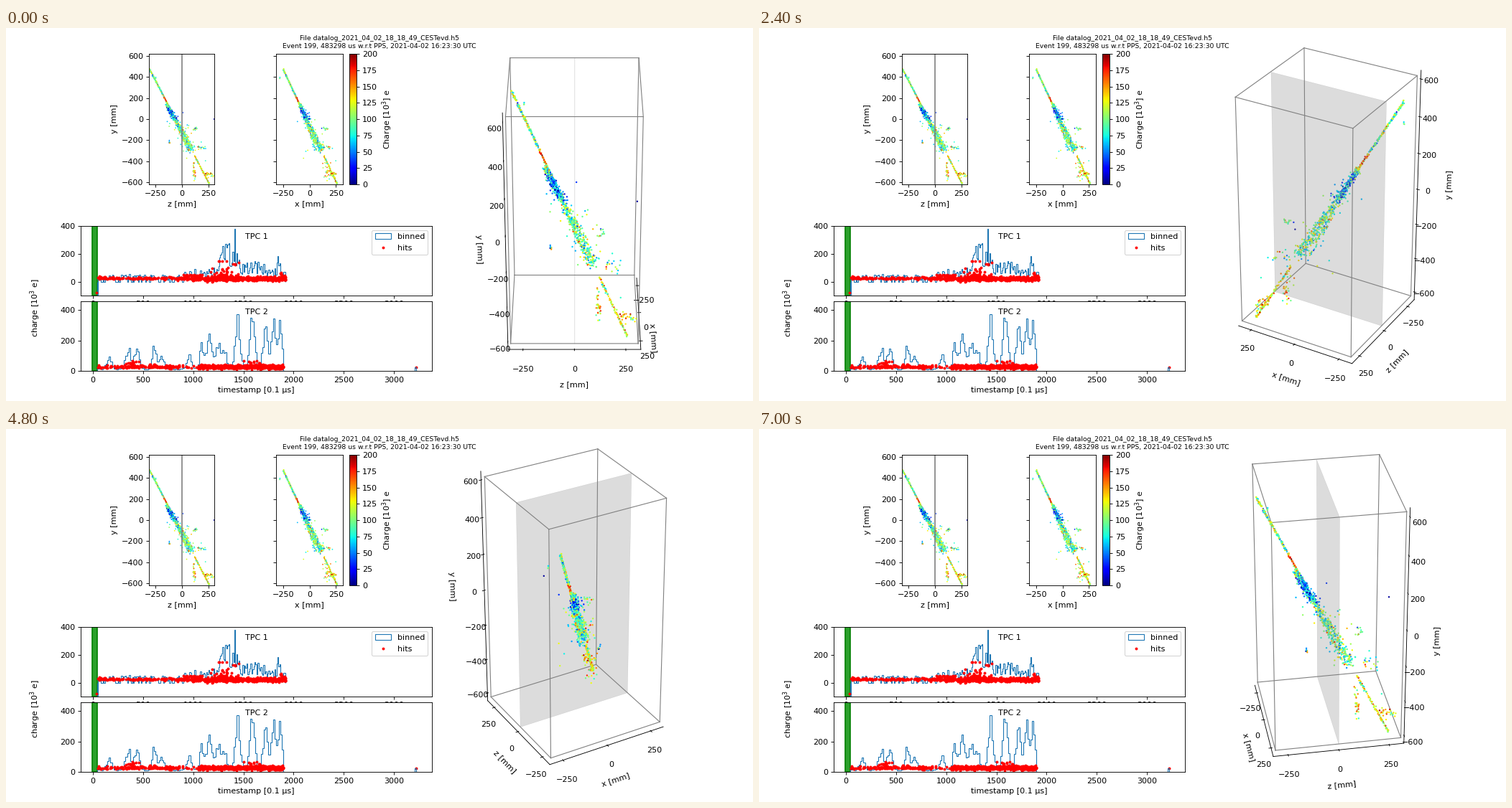
These frames come from a looping animation (1040 px wide and 520 px high, 7.2 s). A matplotlib script:

```python
import numpy as np
import matplotlib.pyplot as plt
from itertools import combinations, product
from matplotlib.animation import FuncAnimation
from mpl_toolkits.mplot3d.art3d import Poly3DCollection

WIDTH, HEIGHT, DPI = 1040, 520, 80
FRAMES, INTERVAL = 36, 200
HALF_X, HALF_Z, HALF_Y = 310, 310, 620
rng = np.random.default_rng(199)

plt.rcParams["font.family"] = "DejaVu Sans"
fig = plt.figure(figsize=(WIDTH / DPI, HEIGHT / DPI), dpi=DPI, facecolor="white")


def pixel_axes(left, top, right, bottom):
    """Axes whose spines lie on the given pixel columns and rows."""
    return fig.add_axes([left / WIDTH, 1 - bottom / HEIGHT,
                         (right - left) / WIDTH, (bottom - top) / HEIGHT])


def bump(t, centre, width):
    return np.exp(-((t - centre) / width) ** 2)


# Detector hits: rows of x, y, z, charge

def track(n, top, bottom, spread, shift=(0, 0, 0), fork=0):
    """Hits near the particle's line; a fork bends away as y falls."""
    y = rng.uniform(bottom, top, n)
    s = (475 - y) / 1087
    bend = fork * (top - y) / (top - bottom)
    line = np.column_stack([-250 + 510 * s + bend, y, -305 + 563 * s + 0.7 * bend])
    return line + shift + rng.normal(0, 1, (n, 3)) * spread


def clump(n, centre, spread):
    return centre + rng.normal(0, 1, (n, 3)) * spread


def charge_of(points):
    """Mean charge by height: a hot stretch, a faint cloud, a bright tail."""
    y = points[:, 1]
    mean = 98 + 70 * bump(y, 180, 40) - 48 * bump(y, 65, 65) + 32 * (y < -335)
    return np.clip(rng.normal(mean, 30), 5, 200)


hits = np.vstack([
    track(250, 475, 0, 2),
    track(200, 140, 0, (8, 8, 7), shift=(0, 0, -12)),
    track(110, 30, -130, 9),
    track(170, -110, -295, 12),
    track(110, 90, -295, 5, fork=-45),
    track(60, 60, -290, 32),
    track(95, -345, -612, 2.5),
    clump(28, (158, -495, 118), (20, 42, 6)),
    clump(28, (225, -530, 250), (16, 15, 26)),
    clump(16, (160, -272, 190), (30, 9, 28)),
    clump(12, (142, -88, 130), (12, 6, 7)),
    clump(8, (70, -220, -115), (4, 14, 4)),
    clump(3, (-280, 390, -245), 4),
    clump(7, (60, -250, 20), (110, 150, 110)),
])
hits = np.clip(hits, (-308, -615, -304), (308, 615, 304))
charge = np.append(charge_of(hits), 5)
x, y, z = np.vstack([hits, (0, 0, 304)]).T
dots = dict(c=charge, cmap="jet", vmin=0, vmax=200, lw=0)

# Flat projections

ax_zy = pixel_axes(199, 36, 290.4, 218)
ax_xy = pixel_axes(376, 36, 469, 218)
for ax, data, name, half in ((ax_zy, z, "z", 309), (ax_xy, x, "x", 315)):
    points = ax.scatter(data, y, s=2.5, **dots)
    ax.set(xlim=(-half, half), ylim=(-617, 617), xlabel=f"{name} [mm]",
           xticks=(-250, 0, 250), yticks=range(-600, 601, 200))
ax_zy.axvline(0, color="gray", lw=1.5)
ax_zy.set_ylabel("y [mm]")
ax_xy.tick_params(labelleft=False)

cax = pixel_axes(478, 36, 488, 218)
fig.colorbar(points, cax=cax, ticks=range(0, 201, 25), label="Charge [$10^3$] e")

# Charge against time

def binned_first():
    edges = np.arange(40, 1921, 10)
    t = edges[:-1]
    envelope = (55 + 45 * bump(t, 1000, 90) + 240 * bump(t, 1340, 140)
                + 95 * bump(t, 1640, 130) + 140 * bump(t, 1855, 40))
    u = rng.uniform(0, 1, t.size)
    sparse = np.where(u < 0.4, 0, envelope * u ** 1.5)
    values = np.where(t < 900, sparse, envelope * (0.28 + 0.72 * u))
    values[t == 1410] = 379
    values[0] = -95
    return values, edges


def binned_second():
    edges = np.arange(40, 1901, 15)
    t = edges[:-1]
    peaks = ((150, 85), (340, 170), (430, 180), (605, 160), (680, 90), (950, 100),
             (1080, 170), (1150, 250), (1235, 230), (1300, 150),
             (1435, 390), (1580, 430), (1710, 340), (1790, 410), (1865, 330))
    envelope = 15 + sum(height * bump(t, centre, 32) for centre, height in peaks)
    return np.minimum(envelope * rng.uniform(0.6, 1.05, t.size), 432), edges


def hit_band(n, start, end, mean, sigma=5):
    return np.column_stack([rng.uniform(start, end, n), rng.normal(mean, sigma, n)])


def hit_peak(n, centre, width, base, height):
    return np.column_stack([rng.normal(centre, width, n),
                            base + height * rng.uniform(0, 1, n) ** 3])


first_hits = np.vstack([
    hit_band(130, 45, 900, 25), hit_band(70, 880, 1150, 22),
    hit_band(30, 880, 1110, 43, 3), hit_band(550, 1130, 1920, 22, 7),
    hit_peak(50, 1310, 65, 35, 115), hit_peak(10, 1885, 15, 35, 35), [(38, -78)]])
second_hits = np.vstack([
    hit_band(110, 45, 1050, 28), hit_peak(40, 400, 45, 25, 45),
    hit_peak(20, 640, 35, 25, 20), hit_band(550, 1050, 1900, 27, 6),
    hit_peak(30, 1620, 60, 30, 36), [(3222, 22)]])

ax_first = pixel_axes(104, 276, 593, 373)
ax_second = pixel_axes(104, 381, 593, 478)
panels = (
    (ax_first, "TPC 1", binned_first(), first_hits, (-100, 400)),
    (ax_second, "TPC 2", binned_second(), second_hits, (0, 459)),
)
for ax, name, (values, edges), series, ylim in panels:
    ax.axvspan(-4, 42, facecolor="tab:green", edgecolor="green", lw=1.5)
    ax.hist(edges[:-1], edges, weights=values, histtype="step",
            color="tab:blue", label="binned")
    ax.plot(*series.T, "r.", ms=5, label="hits")
    ax.text(0.5, 79 / 97, name, transform=ax.transAxes, ha="center")
    ax.set(xlim=(-122, 3379), ylim=ylim, yticks=range(0, 401, 200))
ax_first.legend(loc="upper right")
ax_first.tick_params(axis="x", pad=2.5)
ax_second.hist([3212], [3205, 3220], weights=[22], histtype="step", color="tab:blue")
ax_second.set_xlabel("timestamp [0.1 µs]")
fig.text(41 / WIDTH, 130 / HEIGHT, "charge [$10^3$ e]", rotation=90,
         ha="center", va="center")

# Rotating view, with the data's y axis pointing up

ax_3d = fig.add_axes([564.4 / WIDTH, 51.3 / HEIGHT, 442 / WIDTH, 442 / HEIGHT],
                     projection="3d", facecolor="none")
ax_3d.scatter(x, z, y, s=4.5, depthshade=False, **dots)

corners = product((-HALF_X, HALF_X), (-HALF_Z, HALF_Z), (-HALF_Y, HALF_Y))
for a, b in combinations(corners, 2):
    if sum(p != q for p, q in zip(a, b)) == 1:
        ax_3d.plot(*zip(a, b), color="gray", lw=1)

cathode = [(-HALF_X, 0, -HALF_Y), (HALF_X, 0, -HALF_Y),
           (HALF_X, 0, HALF_Y), (-HALF_X, 0, HALF_Y)]
shade = (0.5, 0.5, 0.5, 0.27)
ax_3d.add_collection3d(Poly3DCollection([cathode], facecolors=[shade],
                                        edgecolors=[shade], linewidths=0.4))

# Axis lines stand slightly outside the drawn box
margin = 25 / 24
ax_3d.set(xlim=(-HALF_X * margin, HALF_X * margin),
          ylim=(-HALF_Z * margin, HALF_Z * margin),
          zlim=(-HALF_Y * margin, HALF_Y * margin),
          xlabel="x [mm]", ylabel="z [mm]",
          xticks=(-250, 0, 250), yticks=(-250, 0, 250),
          zticks=range(-600, 601, 200))
ax_3d.set_zlabel("y [mm]", labelpad=17)
ax_3d.set_box_aspect((1, 1, 2))
ax_3d.grid(False)
for axis in (ax_3d.xaxis, ax_3d.yaxis, ax_3d.zaxis):
    axis.pane.set_visible(False)

fig.suptitle("File datalog_2021_04_02_18_18_49_CESTevd.h5\n"
             "Event 199, 483298 us w.r.t PPS, 2021-04-02 16:23:30 UTC",
             fontsize="small")


def update(frame):
    # The tiny offset settles which edges carry the axes in square-on views
    ax_3d.view_init(elev=30, azim=frame * 360 / FRAMES + 0.01)
    return []


animation = FuncAnimation(fig, update, frames=FRAMES, interval=INTERVAL,
                          init_func=lambda: update(0), repeat=True)
plt.show()
```
